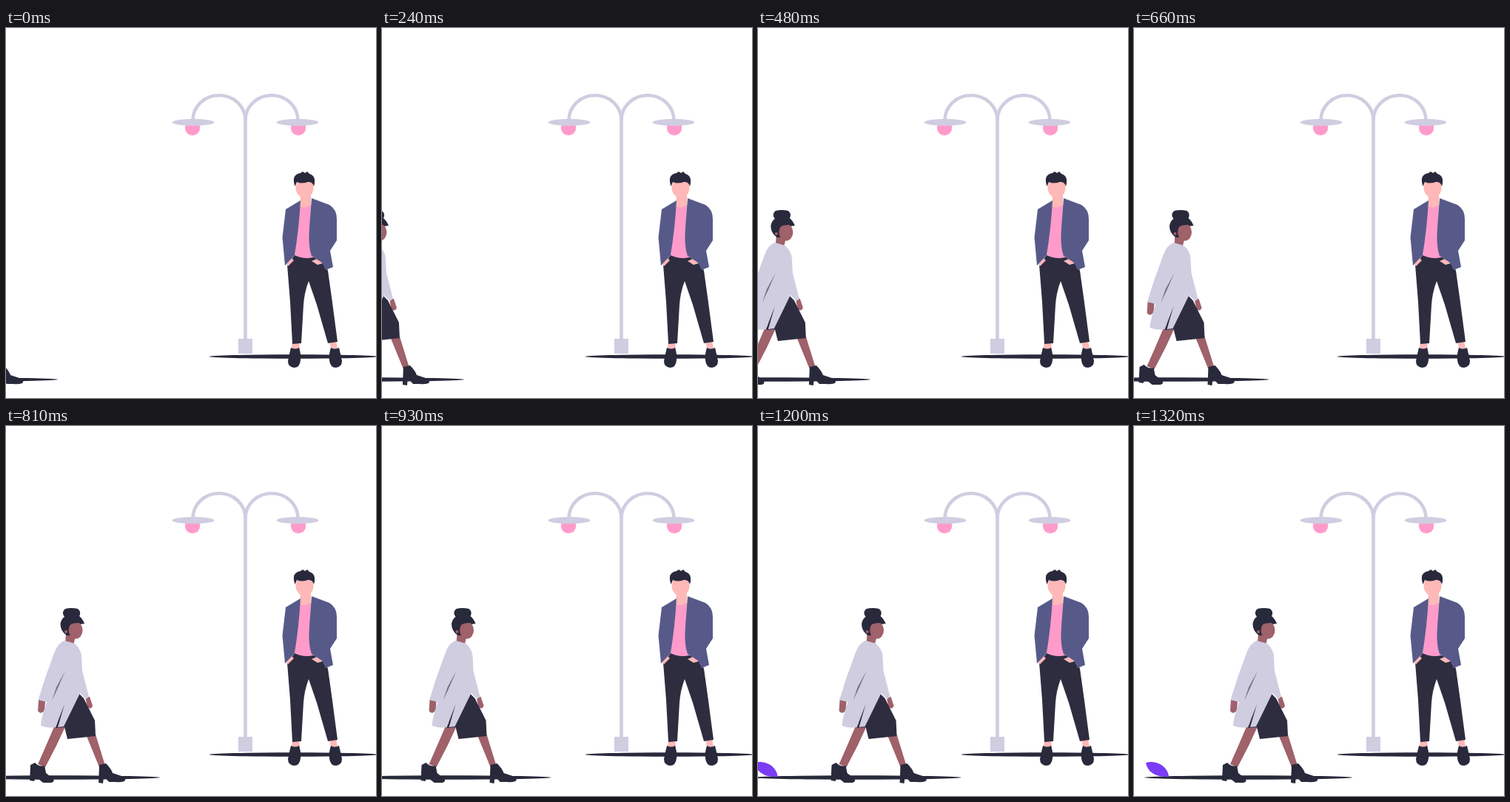
An HTML page for the animation above (1.35 s loop, 500 by 500 pixels).

```html
<!DOCTYPE html>
<html lang="en">
<head>
<meta charset="utf-8">
<title>Evening walk</title>
<style>
  html, body { margin: 0; width: 100%; height: 100%; overflow: hidden; background: #fff; }
  svg { display: block; width: 100%; height: 100%; }
  .soft { filter: blur(.6px); }
  .dark { fill: #2e2d40; }
  .ink { fill: #28293b; }
  .pale { fill: #d0cde1; }
  .pink { fill: #ff9bcb; }
  .jacket { fill: #575a89; }
  .skin { fill: #feb8b7; }
  .brown { fill: #9f616a; }
  .arm { fill: none; stroke: #d0cde1; stroke-width: 4.5; }
</style>
</head>
<body>
<svg viewBox="0 0 500 500">
  <defs>
    <g id="lamp">
      <circle class="pink" cx="252" cy="135" r="10.2"/>
      <path class="arm" d="M252.5 125C252.5 106 268 91 288 91S323.5 106 323.5 125"/>
      <ellipse class="pale" cx="253" cy="127.5" rx="28.5" ry="4.7"/>
    </g>
    <path id="shoe" d="M385 432Q391 435 396 432Q399 441 398 449Q397 459 389 459Q381 458 381 450Q383 440 385 432Z"/>
  </defs>

  <g id="street" class="soft">
    <ellipse class="ink" cx="388.5" cy="444" rx="114" ry="2.7"/>
    <use href="#lamp"/>
    <use href="#lamp" transform="matrix(-1 0 0 1 647 0)"/>
    <path class="pale" d="M321.2 120H325.8V420H333V440H314V420H321.2Z"/>
  </g>

  <g id="man" class="soft">
    <path class="skin" d="M387 423H396L397 434H386ZM437 422H446L448 433H439Z"/>
    <use href="#shoe" class="ink"/>
    <use href="#shoe" class="ink" transform="matrix(-1 0 0 1 835 0)"/>
    <path class="dark" d="M390 307L414 309L430 317L435 328L441 371L448 424L435 426L420 374L409 342Q403 358 402 374L399 426L387 427L384 370L380 320Z"/>
    <path class="pink" d="M397 240L412 239L411 285L415 310Q402 313 390 307Z"/>
    <path class="skin" d="M398 224H412V238Q405 245 397 241ZM379 319L386 311L389 314L381 322ZM413 315L422 311L428 318L421 320Z"/>
    <path class="jacket" d="M398 233L378 245L373.500 283L377 321L390 307Q396 270 398 233ZM413 230L437 239Q447 245 447 258V287L438 301L442 323L432 327L427 317L413 308Q408 295 410 270Z"/>
    <ellipse class="skin" cx="403.5" cy="216" rx="12" ry="13.5"/>
    <path class="ink" d="M390.500 214Q385 198 398 196L401 194L404 196L407 194L410 197Q420 200 416 214Q414 207 408 208Q399 211 393 208Z"/>
  </g>

  <g id="walk" class="soft">
    <ellipse class="ink" cx="154.5" cy="475" rx="140.5" ry="2.7"/>
    <path fill="#7a3cf5" d="M16 455C30 451 46 460 47 474C30 475 18 468 16 455Z"/>
    <path class="brown" d="M153 404L168 404L155 432L140 461L130 457L141 432ZM195 417L208 417L221 459L213 461ZM131 370L140 372L139 384Q134 391 130 385ZM194 366L200 366L204 378Q202 384 197 380Z"/>
    <path class="dark" d="M165 372L186 362L192 368L207 398L208 419L170 423L166 407L154 408Z"/>
    <path class="ink" d="M120 458L126 455Q132 461 139 459L141 469L151 477Q153 481 148 482H137L127 474L125 480L119 479ZM213 458L222 456Q229 463 231 469L246 474Q250 476 247 480Q241 482 235 481H226L219 473L218 483L212 482Z"/>
    <path class="brown" d="M168 279L181 284L178 296L167 292Z"/>
    <path class="pale" d="M166 290L180 294Q189 303 189 312L190 331L199 366L195 369L187 361L186 363L165 406L157 407L166 376L154 407Q144 409 134 405Q134 396 142 373L130.500 370L140 340L152 307Q157 293 166 290Z"/>
    <path fill="#77707f" d="M167 331L157 354L149 371L155 353Z"/>
    <path class="ink" d="M167 247Q175 245 184 247Q189 251 186 257Q190 260 193 267L187 268L177 283L169 283Q160 277 160.500 267Q162 260 166 258Q161 251 167 247Z"/>
    <ellipse class="brown" cx="181" cy="276" rx="9.500" ry="11.500"/>
    <circle class="brown" cx="168" cy="278" r="2"/>
    <path class="ink" d="M167 264Q180 257 193 267Q181 264 172 269Z"/>
  </g>
</svg>
<script>
  const LOOP = 1350, STEP = 30, LAST = LOOP - STEP, TRAVEL = 225;
  const walk = document.getElementById('walk');

  function draw(now) {
    const time = Math.floor((now % LOOP) / STEP) * STEP;
    walk.setAttribute('transform', `translate(${TRAVEL * (time / LAST - 1)} 0)`);
  }

  function tick() {
    draw(performance.now());
    requestAnimationFrame(tick);
  }
  tick();
</script>
</body>
</html>
```
